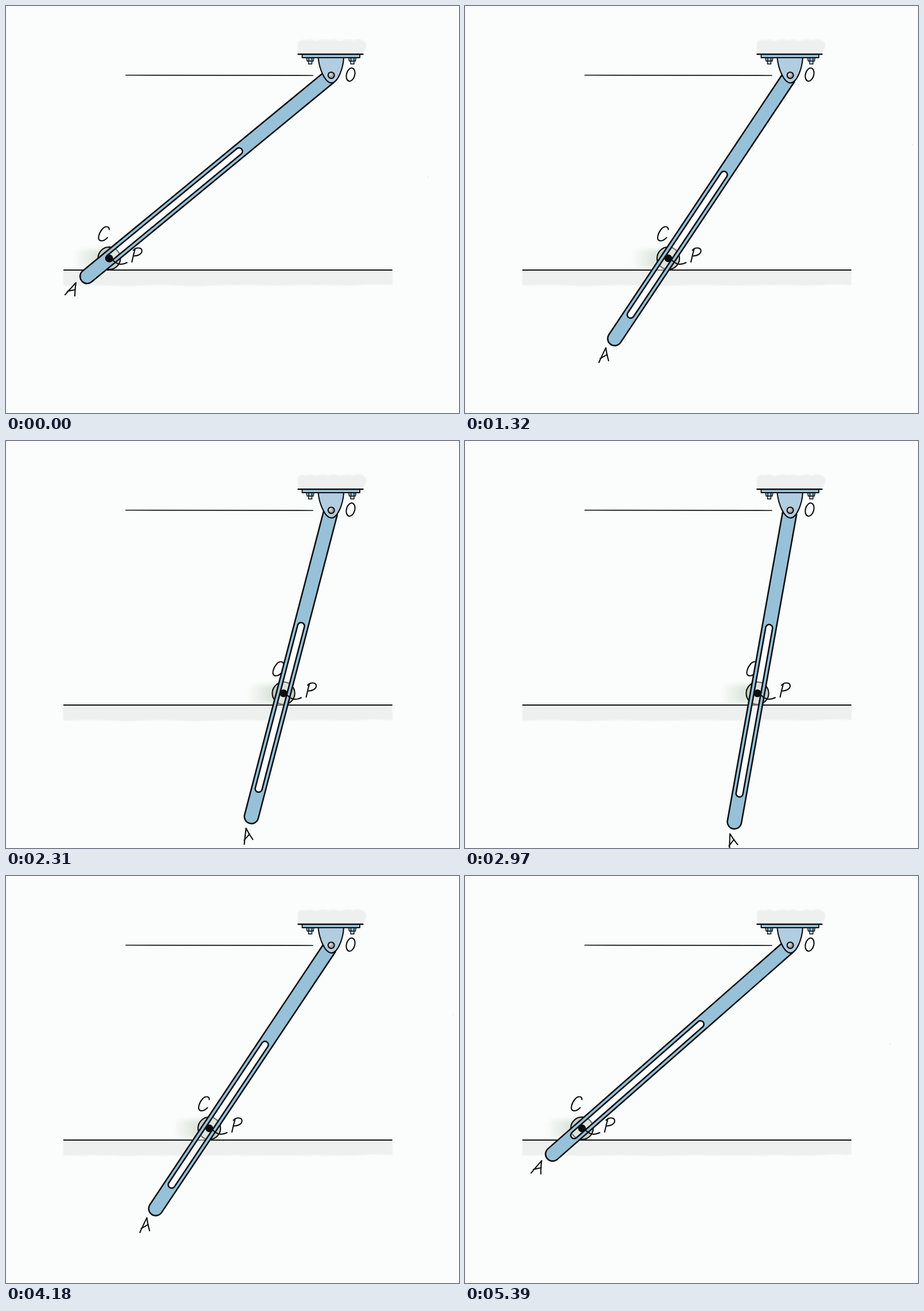
Recreate the animation shown at these times as an HTML page. Size 790 px wide and 709 px high, loop 5500 ms.

```html
<!DOCTYPE html>
<html lang="en">
<head>
<meta charset="utf-8">
<title>Slotted arm and roller</title>
<style>
html, body { margin: 0; height: 100%; overflow: hidden; background: #fbfdfc; }
svg { display: block; width: 790px; height: 709px; }
.ink { fill: none; stroke: #0b0d0f; stroke-width: 2.1; stroke-linecap: round; stroke-linejoin: round; }
</style>
</head>
<body>
<svg viewBox="0 0 790 709">
  <defs>
    <linearGradient id="trail">
      <stop offset="0" stop-color="#d3dfd2" stop-opacity="0"/>
      <stop offset=".6" stop-color="#d3dfd2" stop-opacity=".7"/>
      <stop offset="1" stop-color="#d3dfd2"/>
    </linearGradient>
    <radialGradient id="steel" cx=".35" cy=".35">
      <stop offset="0" stop-color="#e6e4e4"/>
      <stop offset="1" stop-color="#99999b"/>
    </radialGradient>
    <filter id="soft" x="-30%" y="-50%" width="160%" height="200%"><feGaussianBlur stdDeviation="4"/></filter>
    <filter id="wash"><feGaussianBlur stdDeviation="1"/></filter>
    <clipPath id="above"><rect x="-100" y="-60" width="200" height="80"/></clipPath>
    <g id="bolt" class="ink" style="stroke-width:1.4">
      <rect x="-3" y="95" width="6" height="6" fill="#c4d6e0"/>
      <path d="M-6.5 90H6.5L5.5 96H-5.5ZM-2.5 90V96M3 90V96" fill="#91bdd3"/>
    </g>
  </defs>

  <path fill="#eef0f0" filter="url(#wash)" d="M100 460H674V486L640 485 600 487 540 486 470 487 400 486 330 488 270 486 210 488 150 486 100 487Z"/>
  <path class="ink" d="M101 460H673" stroke-width="2.3"/>
  <path class="ink" style="stroke-width:1.7" d="M209 120.5L535 121"/>

  <g id="roller">
    <g clip-path="url(#above)"><rect x="-64" y="-15" width="60" height="32" fill="url(#trail)" filter="url(#soft)"/></g>
    <circle class="ink" r="19.6" style="fill:#c6d1c6"/>
    <path class="ink" d="M0-50C0-57-8-56-12-51C-18-44-21-33-16-31C-11-29-6-33-3-36"/>
  </g>

  <g id="arm">
    <g transform="translate(567 121) rotate(140.55)">
      <rect x="202" y="-6" width="305" height="12" rx="6" fill="#fff" fill-opacity=".4"/>
      <path class="ink" style="fill:#97c1d8;fill-rule:evenodd;stroke-width:2.6" d="M5-12.3H551a12.3 12.3 0 0 1 0 24.6H5"
        />
      <path id="slot" class="ink" style="stroke-width:2" d="M208-6H501a6 6 0 0 1 0 12H208a6 6 0 0 1 0-12Z"/>
    </g>
    <path class="ink" d="M103 503Q109 496 122 482Q120 493 120 505M107 497L121 494"/>
    <circle cx="736" cy="298" r=".7" fill="#c9cccb"/>
  </g>

  <g id="pin">
    <circle r="6.8" fill="#0b0d0f"/>
    <path class="ink" d="M6 3C13 10 20 13 31 7.5"/>
    <path class="ink" d="M45-16Q42-5 39.500 6.500M42-14C47-20 57-19 57-13C57-7 49-4 43-4"/>
  </g>

  <path fill="#eeefef" filter="url(#wash)" d="M509 84V64Q513 57 522 60Q530 56 540 61Q552 56 562 60Q572 56 583 61Q594 56 605 60Q615 55 624 61Q631 66 627 74L622 84Z"/>
  <use href="#bolt" x="530.500"/>
  <use href="#bolt" x="604"/>
  <path class="ink" style="fill:#b2cce0" d="M544.500 90C546 108 556 134 567.500 134C579 134 588 108 589 90Z"/>
  <path class="ink" style="fill:#9bc4d9;stroke-width:1.8" d="M516.500 84H617V90H516.500Z"/>
  <path class="ink" style="stroke-width:2.4" d="M509.500 84H622.500"/>
  <circle class="ink" cx="567.200" cy="120.700" r="5.500" style="fill:url(#steel)"/>
  <ellipse class="ink" cx="601" cy="119.500" rx="7.200" ry="11.700" transform="rotate(15 601 119.500)"/>
</svg>
<script>
const $ = id => document.getElementById(id);
const STEP = 110, COUNT = 50, PIVOT = [567, 121], AXLE_Y = 439.5;

// Cut the slot out of the bar so the roller shows through.
const bar = $('slot').previousElementSibling;
bar.setAttribute('d', bar.getAttribute('d') + $('slot').getAttribute('d'));
$('slot').remove();

// Roller positions [step, x] for the way right; the way back mirrors them.
const path = [[0, 180], [1, 204], [2, 217.5], [6, 275], [7, 289.8], [8, 303.7], [12, 354.5],
  [14, 383], [16, 411.5], [18, 443], [20, 471], [23, 510], [25, 535]];

function rollerX(k) {
  const i = Math.max(1, path.findIndex(p => p[0] >= k));
  const [k0, x0] = path[i - 1], [k1, x1] = path[i];
  return x0 + (x1 - x0) * (k - k0) / (k1 - k0);
}

const tilt = x => Math.atan2(AXLE_Y - PIVOT[1], PIVOT[0] - x) * 180 / Math.PI;
const start = tilt(path[0][1]);

function draw(now) {
  const n = Math.floor(now / STEP) % COUNT;
  const x = rollerX(Math.min(n, COUNT - n));
  const place = `translate(${x} ${AXLE_Y})`;
  $('roller').setAttribute('transform', place);
  $('pin').setAttribute('transform', place);
  $('arm').setAttribute('transform', `rotate(${start - tilt(x)} ${PIVOT})`);
}

const t0 = performance.now();
function tick() {
  draw(performance.now() - t0);
  requestAnimationFrame(tick);
}
tick();
</script>
</body>
</html>
```
